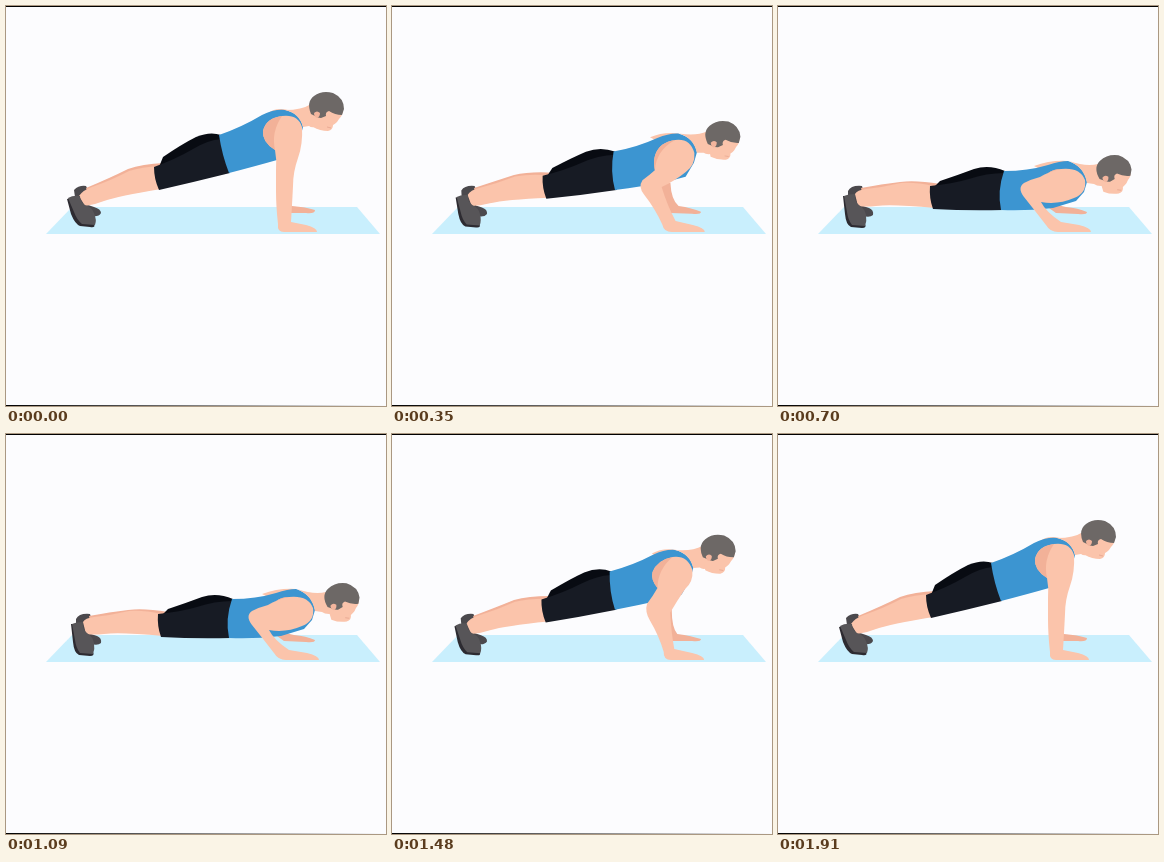
An HTML page for the animation above (1.95 s loop, 380 by 400 pixels).

```html
<!DOCTYPE html>
<html lang="en">
<head>
<meta charset="utf-8">
<title>Push-up</title>
<style>
html, body { margin: 0; width: 100%; height: 100%; overflow: hidden; background: #fcfcfe; }
svg { display: block; width: 380px; height: 400px; }
</style>
</head>
<body>
<svg id="stage" viewBox="0 0 380 400">
  <rect width="380" height="400" fill="#fcfcfe"/>
  <path d="M0 0H380V1H0ZM0 399H380L0 400Z" fill="#000"/>
  <path d="M66 201L351 201L374 228L40 228Z" fill="#c9effd"/>
  <g id="body"></g>
  <g id="head">
    <path fill="#fbc4ab" d="M304 101L337 104Q337 109 333 113L331 116Q329 118 327 119Q327 124 322 125Q314 125 307 121Z"/>
    <path fill="#6d6866" d="M305 108Q300 96 308 90Q316 84 327 87Q338 92 338 103L336 109Q329 109 323 105Q319 106 320 110L315 112Q312 112 309 110Z"/>
    <path fill="#f3b59d" d="M308 107Q311 104 314 107Q314 111 311 112Q308 111 308 107Z"/>
    <path d="M321 121L325 122" stroke="#eaab95" fill="none"/>
  </g>
</svg>
<script>
const LOOP = 1950, STEP = 130 / 3;
const SKIN = '#fbc4ab', SHADE = '#f2b198', DARK = '#575558';

// Each part: fill, then its outline in poses from raised to lowered
const parts = [
  ['#4b494d',
    'M68 184Q73 179 80 180L83 186L82 199L88 201Q95 203 95 207Q93 211 86 210L79 206L69 191Z',
    'M70 185Q73 179 84 180L86 187L85 200L91 202Q96 204 95 209Q92 212 85 210L78 206L70 191Z'],
  [SHADE,
    'M80 182Q104 172 122 163Q136 158 158 157L156 169L83 190Z',
    'M83 182Q104 178 122 176Q138 174 162 178L158 188L85 190Z'],
  [SKIN,
    'M73 190Q77 184 86 181Q106 174 123 165Q136 161 153 160L155 183Q112 190 98 195Q88 199 79 200Z',
    'M77 188Q79 184 88 183Q106 181 123 177Q138 176 155 180L157 202Q114 198 98 200Q88 201 80 200Z'],
  ['#2d2b31',
    'M61 193L66 192L77 216L88 218Q90 222 84 221L74 220Q69 218 65 208Z',
    'M65 190L69 190L73 216L87 218Q89 222 84 222L73 221Q68 219 67 208Z'],
  [DARK,
    'M62 192Q67 189 74 190Q74 196 79 199Q86 201 88 207Q91 214 89 219L76 218Q71 214 68 206Z',
    'M66 190Q70 188 77 188Q76 195 81 199Q87 203 88 209Q89 215 87 220L74 219Q70 214 69 206Z'],
  ['#080b12',
    'M153 161L157 151Q176 138 190 131Q204 125 215 129L218 148Z',
    'M156 181L162 175Q180 169 196 163Q211 158 227 165L224 182Z'],
  ['#171b24',
    'M148 161Q170 153 187 143Q202 134 215 133L224 167Q188 176 153 184Q148 173 148 161Z',
    'M152 180Q174 178 191 173Q208 167 227 167L225 204Q190 205 155 203Q151 192 152 180Z'],
  [SHADE,
    'M276 180L284 182Q283 196 286 200Q300 201 309 204Q309 208 300 207L280 207Z',
    'M270 176L280 176Q280 194 285 200Q300 202 309 205Q309 208 300 207L278 207Z',
    'M264 180L278 177Q279 194 287 200Q300 202 309 206Q309 209 300 208L278 207Z',
    'M264 197L276 196Q281 200 288 201Q300 202 309 206Q309 209 300 208L278 207Z'],
  [SKIN,
    'M262 107Q270 101 282 104Q270 109 264 109Z',
    'M256 160Q272 154 290 155Q275 161 262 163Z'],
  ['#3c95d1',
    'M213 129Q236 121 256 109Q268 103 279 104Q294 107 297 121L294 132L285 150L271 154Q250 160 223 167Q216 149 213 129Z',
    'M226 165Q250 165 270 159Q282 155 290 155Q306 160 309 176L306 186L298 195L275 202Q250 205 223 204Q219 185 226 165Z'],
  [SKIN,
    'M279 104Q296 104 305 98L320 115Q308 124 303 120L297 121Q293 107 279 104Z',
    'M291 155Q308 161 320 158L334 178Q321 182 316 178L309 177Q306 161 291 155Z'],
  [SKIN,
    'M276 110Q292 108 296 121Q297 138 292 152Q287 166 287 180Q286 200 285 216L300 219Q311 222 311 226L278 226Q271 226 272 218Q270 200 270 185Q270 175 270 165Q271 154 269 144Q256 136 257 125Q260 112 276 110Z',
    'M280 121Q295 119 300 134Q301 146 293 153Q285 166 280 178Q280 198 282 215L300 219Q312 222 312 226L279 226Q271 226 272 218Q268 202 259 186Q254 177 256 169Q262 160 266 152Q258 144 260 136Q265 124 280 121Z',
    'M284 138Q299 136 303 151Q304 163 294 170Q283 177 267 182Q274 200 284 215L301 219Q313 222 313 226L280 226Q272 226 270 219Q262 203 250 189Q244 182 249 176Q256 172 262 168Q262 158 264 153Q268 140 284 138Z',
    'M283 163Q302 161 307 174Q309 187 296 192Q280 199 263 196Q268 206 283 216L301 219Q313 222 313 226L280 226Q272 226 268 219Q258 206 246 191Q239 182 246 177Q254 173 262 171Q267 168 270 167Q276 163 283 163Z'],
  [SHADE,
    'M276 110Q260 112 257 125Q256 136 269 144Q265 126 276 110Z',
    'M280 121Q265 124 260 136Q258 144 266 152Q266 134 280 121Z',
    'M284 138Q268 140 264 153Q262 158 262 168Q264 147 284 138Z',
    'M283 163Q276 163 270 167Q267 168 262 171Q272 165 283 163Z']
];

const body = document.getElementById('body');
const head = document.getElementById('head');
const clamp = v => Math.min(1, Math.max(0, v));
const soft = p => p * .75 + p * p * (3 - 2 * p) * .25;
const lean = u => Math.sin(u * Math.PI / 2);

const shapes = parts.map(([fill, ...poses]) => {
  const el = document.createElementNS('http://www.w3.org/2000/svg', 'path');
  el.setAttribute('fill', fill);
  body.append(el);
  return { el, form: poses[0], poses: poses.map(d => d.match(/\d+/g).map(Number)) };
});

// Poses lie closer together near the top, where the elbow bends fastest.
// Horizontal travel leads the vertical one, so the body follows an arc.
function morph({ el, form, poses }, u) {
  const last = poses.length - 1;
  const stop = i => (i / last) ** 1.5;
  let seg = 0;
  while (seg < last - 1 && u >= stop(seg + 1)) seg++;
  const from = stop(seg), to = stop(seg + 1);
  const ky = (u - from) / (to - from);
  const kx = (lean(u) - lean(from)) / (lean(to) - lean(from));
  let i = 0;
  el.setAttribute('d', form.replace(/\d+/g, () => {
    const a = poses[seg][i], b = poses[seg + 1][i];
    return (a + (b - a) * (i++ % 2 ? ky : kx)).toFixed(2);
  }));
}

function depth(t) {
  const rising = t >= 1090;
  const start = rising ? 1090 : 90;
  const held = Math.floor((t - start) / STEP + .02) * STEP;
  const p = soft(clamp(held / (rising ? 525 : 560)));
  return rising ? 1 - p : p;
}

function draw(t) {
  const u = depth(t);
  shapes.forEach(s => morph(s, u));
  head.setAttribute('transform',
    `translate(${16 * lean(u)} ${63 * u}) rotate(${-8 * u} 320 105)`);
}

const begin = performance.now();
function tick() {
  draw((performance.now() - begin) % LOOP);
  requestAnimationFrame(tick);
}
tick();
</script>
</body>
</html>
```
